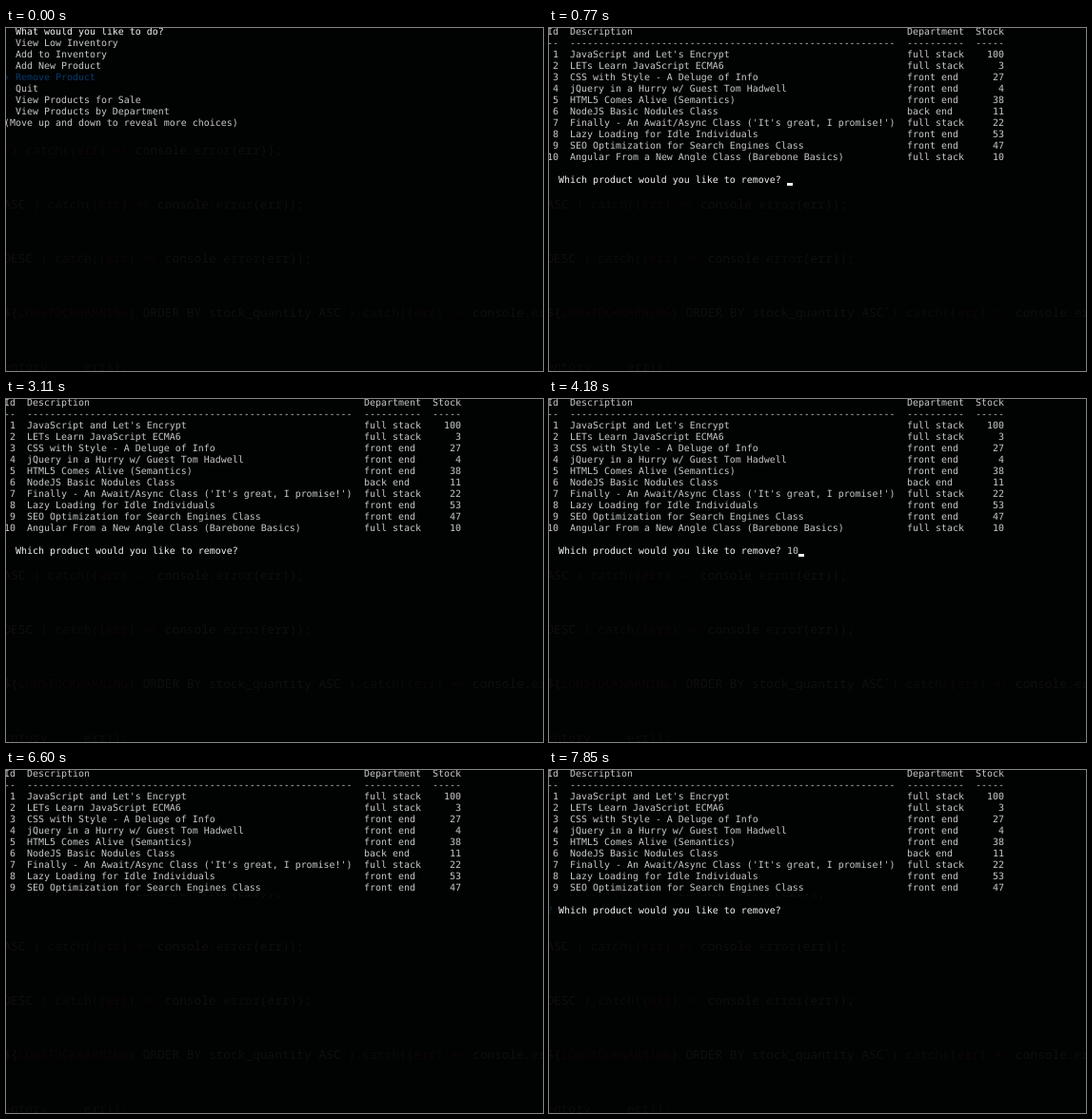
An HTML page that plays this animation: 564 px wide and 361 px high, repeating every 8 s.

```html
<!DOCTYPE html>
<html lang="en">
<head>
<meta charset="utf-8">
<title>Inventory terminal</title>
<style>
  html, body { margin: 0; width: 100%; height: 100%; overflow: hidden; background: #010202; }
  svg { display: block; width: 564px; height: 361px; }
  text { white-space: pre; text-rendering: geometricPrecision; }
  .term text { font: 9.967px "DejaVu Sans Mono", monospace; fill: #c8c8c8; }
  .code text { font: 12.83px "Noto Sans Mono", monospace; fill: #0b0b0b; }
  .term .white { fill: #f4f4f4; }
  .term .mark { fill: #0d2a38; }
  .term .answer { fill: #008080; }
  .term .blue { fill: #063a6c; }
  .term .teal { fill: #04617f; }
  .code .lit { fill: #0f0f0f; }
  .code .mid { fill: #0c0c0c; }
  .code .red { fill: #0e0606; }
</style>
</head>
<body>
<svg viewBox="0 0 564 361">
  <rect width="564" height="361" fill="#010202"/>
  <g class="code"></g>
  <g class="term"></g>
</svg>
<script>
const NS = "http://www.w3.org/2000/svg";
const LOOP = 8000, CELL = 6, LINE = 12, LEFT = -2, BACK = "#010202";
const code = document.querySelector(".code");
const term = document.querySelector(".term");

function add(parent, tag, attrs, text) {
  const el = document.createElementNS(NS, tag);
  for (const key in attrs) el.setAttribute(key, attrs[key]);
  if (text) el.textContent = text;
  return parent.appendChild(el);
}

// Faint editor text behind the terminal
const tail = [["`).catch(("], ["err", "red"], [") "], ["=>", "red"], [" "],
  ["console", "lit"], [".error", "mid"], ["(err));", "lit"]];
const codeLines = [
  tail,
  [["ASC", "lit"], ...tail],
  [["DESC", "lit"], ...tail],
  [["${", "lit"], ["LOWSTOCKWARNING", "red"], ["} "], ["ORDER BY stock_quantity ASC", "lit"], ...tail],
  [["entory     "], ["err));", "mid"]]
];
codeLines.forEach((parts, i) => {
  const line = add(code, "text", { x: -2.6, y: 133 + 57 * i });
  for (const [str, cls = ""] of parts) add(line, "tspan", { class: cls }, str);
});

// Terminal pieces, placed by column and row; written cells hide the code behind
function cells(g, col, row, count) {
  add(g, "rect", { x: LEFT + CELL * col, y: LINE * row - 2, width: CELL * count, height: LINE, fill: BACK });
}
function put(g, col, row, str, cls = "") {
  cells(g, col, row, str.length);
  add(g, "text", { x: LEFT + CELL * col, y: 7 + LINE * row, class: cls }, str);
}
function group(...spans) {
  const g = add(term, "g", { visibility: "hidden" });
  g.spans = spans;
  return g;
}
function cursor(col, row, ...spans) {
  add(group(...spans), "rect",
    { x: LEFT + CELL * col, y: LINE * row + 7, width: CELL, height: 3, fill: "#f4f4f4" });
}

const choices = [
  "View Products for Sale", "View Products by Department",
  "View Products by Inventory (ascending)", "View Products by Inventory (descending)",
  "View Low Inventory", "Add to Inventory", "Add New Product", "Remove Product", "Quit"
];
const ask = "What would you like to do?";
const removeAsk = "Which product would you like to remove?";

function menu(g, row, first, pointer, tint) {
  put(g, 2, row, ask, "white");
  for (let i = 0; i < 7; i++) {
    const on = i === pointer;
    if (on) put(g, 0, row + 1 + i, "›", tint);
    put(g, 2, row + 1 + i, choices[(first + i) % choices.length], on ? tint : "");
  }
  put(g, 0, row + 8, "(Move up and down to reveal more choices)");
}

const products = [
  ["JavaScript and Let's Encrypt", "full stack", 100],
  ["LETs Learn JavaScript ECMA6", "full stack", 3],
  ["CSS with Style - A Deluge of Info", "front end", 27],
  ["jQuery in a Hurry w/ Guest Tom Hadwell", "front end", 4],
  ["HTML5 Comes Alive (Semantics)", "front end", 38],
  ["NodeJS Basic Nodules Class", "back end", 11],
  ["Finally - An Await/Async Class ('It's great, I promise!')", "full stack", 22],
  ["Lazy Loading for Idle Individuals", "front end", 53],
  ["SEO Optimization for Search Engines Class", "front end", 47],
  ["Angular From a New Angle Class (Barebone Basics)", "full stack", 10]
];
function tableRow(g, row, id, name, dept, stock) {
  cells(g, 0, row, 80);
  put(g, 0, row, id);
  put(g, 4, row, name);
  put(g, 63, row, dept);
  put(g, 75, row, stock);
}
function productRow(g, i) {
  const [name, dept, stock] = products[i];
  tableRow(g, i + 2, String(i + 1).padStart(2), name, dept, String(stock).padStart(5));
}

// Opening menu and the chosen answer
menu(group([0, 700]), 0, 4, 3, "blue");
const chosen = group([700, 770]);
put(chosen, 2, 0, ask, "white");
put(chosen, 29, 0, "Remove Product", "answer");
put(chosen, 0, 1, "authenticated");
cursor(0, 2, [700, 770]);

// Product table
const table = group([770, LOOP]);
tableRow(table, 0, "Id", "Description", "Department", "Stock");
tableRow(table, 1, "--", "-".repeat(57), "-".repeat(10), "-".repeat(5));
for (let i = 0; i < 9; i++) productRow(table, i);

// Removing product 10
const removal = group([770, 4350]);
productRow(removal, 9);
put(removal, 2, 13, removeAsk, "white");
put(group([3180, 4350]), 42, 13, "1");
put(group([3490, 4350]), 43, 13, "0");
cursor(42, 13, [770, 1000], [1550, 2100], [2560, 3110]);
cursor(43, 13, [3180, 3490]);
cursor(44, 13, [3490, 3650], [4180, 4350]);

// Menu below the shortened table, moved up twice
const fresh = group([4350, 6600]);
menu(fresh, 12, 0, 0, "teal");
put(fresh, 29, 12, "(Use arrow keys)");
menu(group([6680, 6980]), 12, 8, 0, "teal");
menu(group([6980, 7450]), 12, 7, 0, "teal");
put(group([4350, 6600], [6680, LOOP]), 0, 12, "?", "mark");

// Second removal prompt
put(group([7450, LOOP]), 2, 12, removeAsk, "white");
cursor(42, 12, [7450, 7850]);

const groups = [...term.children];
const start = performance.now();
function render() {
  const t = (performance.now() - start) % LOOP;
  for (const g of groups) {
    const on = g.spans.some(([from, to]) => t >= from && t < to);
    g.setAttribute("visibility", on ? "visible" : "hidden");
  }
  requestAnimationFrame(render);
}
render();
</script>
</body>
</html>
```
